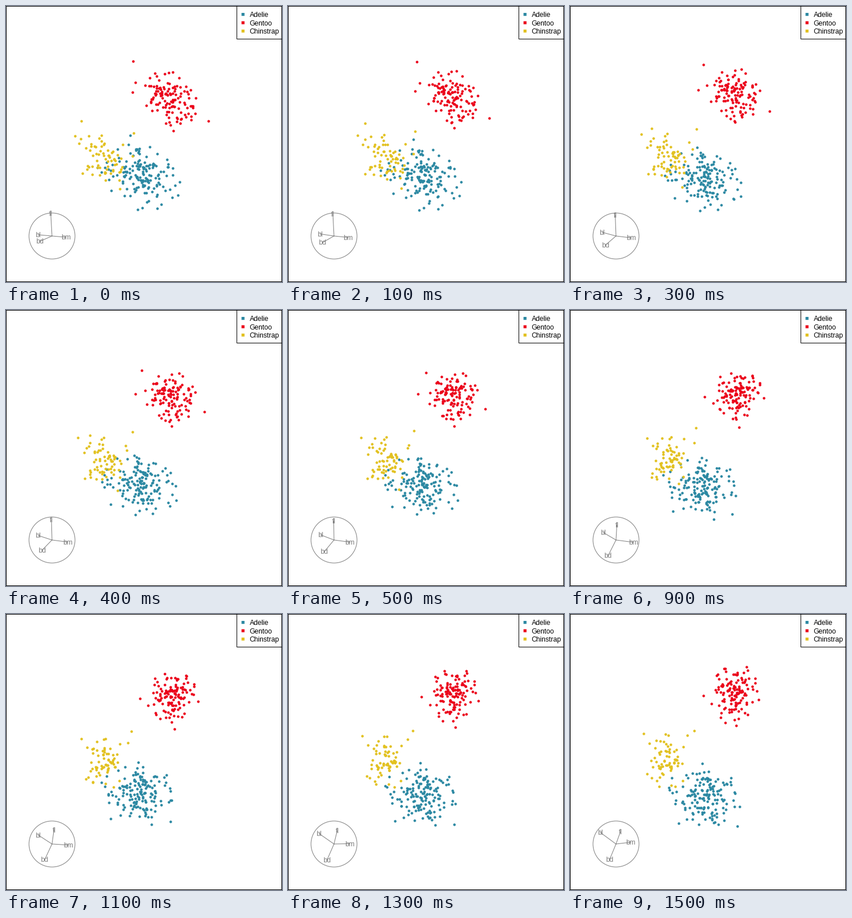
A matplotlib script that plays this animation: 480 px wide and 480 px high, repeating every 1600 ms.

```python
import numpy as np
import matplotlib.pyplot as plt
from matplotlib.animation import FuncAnimation
from matplotlib.patches import Circle, Rectangle

SIZE, DPI, FRAMES, STEP_MS = 480, 100, 16, 100
PX = 72 / DPI  # points per pixel
CENTER, SCALE = 240, 58
HUB, RADIUS = np.array([80, 400]), 40
GREY = "#7f7f7f"
FONT = dict(family="Liberation Sans", size=12 * PX, va="baseline")

# Variables: bill length, bill depth, flipper length, body mass
NAMES = ["bl", "bd", "fl", "bm"]
SPREAD = np.array([0.55, 0.57, 0.47, 0.57])

# name, colour, count, correlation, standardised mean
SPECIES = [
    ("Adelie", "#2b88a2", 151, 0.45, (-0.94, 0.61, -0.78, -0.62)),
    ("Gentoo", "#eb0019", 123, 0.68, (0.66, -1.10, 1.16, 1.09)),
    ("Chinstrap", "#e2c120", 68, 0.58, (0.90, 0.64, -0.36, -0.58)),
]

# Projection planes the tour passes through, as axis tips in pixels
KEY_TIMES = [0, 9, 15]
KEY_PLANES = np.array([
    [(-24, -2), (-20.5, 9), (-2, -38), (24, 2)],
    [(-22, -13), (-13.5, 27), (1.5, -26), (30, 4)],
    [(-27, -20), (-11, 27), (7.5, -21), (25.5, -3)],
]) / RADIUS


def make_cloud(rng, count, corr, mean):
    """Normal cloud whose variables share one common size factor."""
    size = rng.normal(size=(count, 1))
    own = rng.normal(size=(count, len(NAMES)))
    z = np.sqrt(corr) * size + np.sqrt(1 - corr) * own
    z = (z - z.mean(axis=0)) / z.std(axis=0)
    return np.array(mean) + SPREAD * z


def plane_at(frame):
    """Blend neighbouring planes and make the result orthonormal."""
    i = 0 if frame < KEY_TIMES[1] else 1
    t = (frame - KEY_TIMES[i]) / (KEY_TIMES[i + 1] - KEY_TIMES[i])
    blend = (1 - t) * KEY_PLANES[i] + t * KEY_PLANES[i + 1]
    u, _, vt = np.linalg.svd(blend, full_matrices=False)
    return u @ vt


fig = plt.figure(figsize=(SIZE / DPI, SIZE / DPI), dpi=DPI, facecolor="white")
ax = fig.add_axes([0, 0, 1, 1])
ax.set(xlim=(0, SIZE), ylim=(SIZE, 0))
ax.axis("off")


def box(x, y, w, h, **style):
    ax.add_patch(Rectangle((x, y), w, h, snap=False, **style))


FRAME = dict(fill=False, ec="black", lw=PX)
box(0.5, 0.5, 479, 479, **FRAME)
box(401.5, 0.5, 78, 57, **FRAME)
ax.add_patch(Circle(HUB, RADIUS, fill=False, ec=GREY, lw=PX))

rng = np.random.default_rng(7)
clouds = []
for row, (name, color, *stats) in enumerate(SPECIES):
    y = 14.6 + 14.5 * row
    box(409.6, y - 2.6, 5.2, 5.2, fc=color, lw=0)
    ax.text(423.5, y + 4.5, name, color="black", **FONT)
    dots, = ax.plot([], [], "o", color=color, ms=4.5 * PX, mew=0, snap=False)
    clouds.append((make_cloud(rng, *stats), dots))

spokes = [ax.plot([], [], color=GREY, lw=PX)[0] for _ in NAMES]
labels = [ax.text(0, 0, s, color=GREY, ha="center", **FONT) for s in NAMES]


def update(frame):
    plane = plane_at(frame)
    for cloud, dots in clouds:
        dots.set_data(*(CENTER + SCALE * cloud @ plane).T)
    for spoke, label, (x, y) in zip(spokes, labels, HUB + RADIUS * plane):
        spoke.set_data([HUB[0], x], [HUB[1], y])
        label.set_position((x, y + 4.2))
    return [dots for _, dots in clouds] + spokes + labels


anim = FuncAnimation(fig, update, frames=FRAMES, interval=STEP_MS,
                     repeat=True, repeat_delay=0)
plt.show()
```
